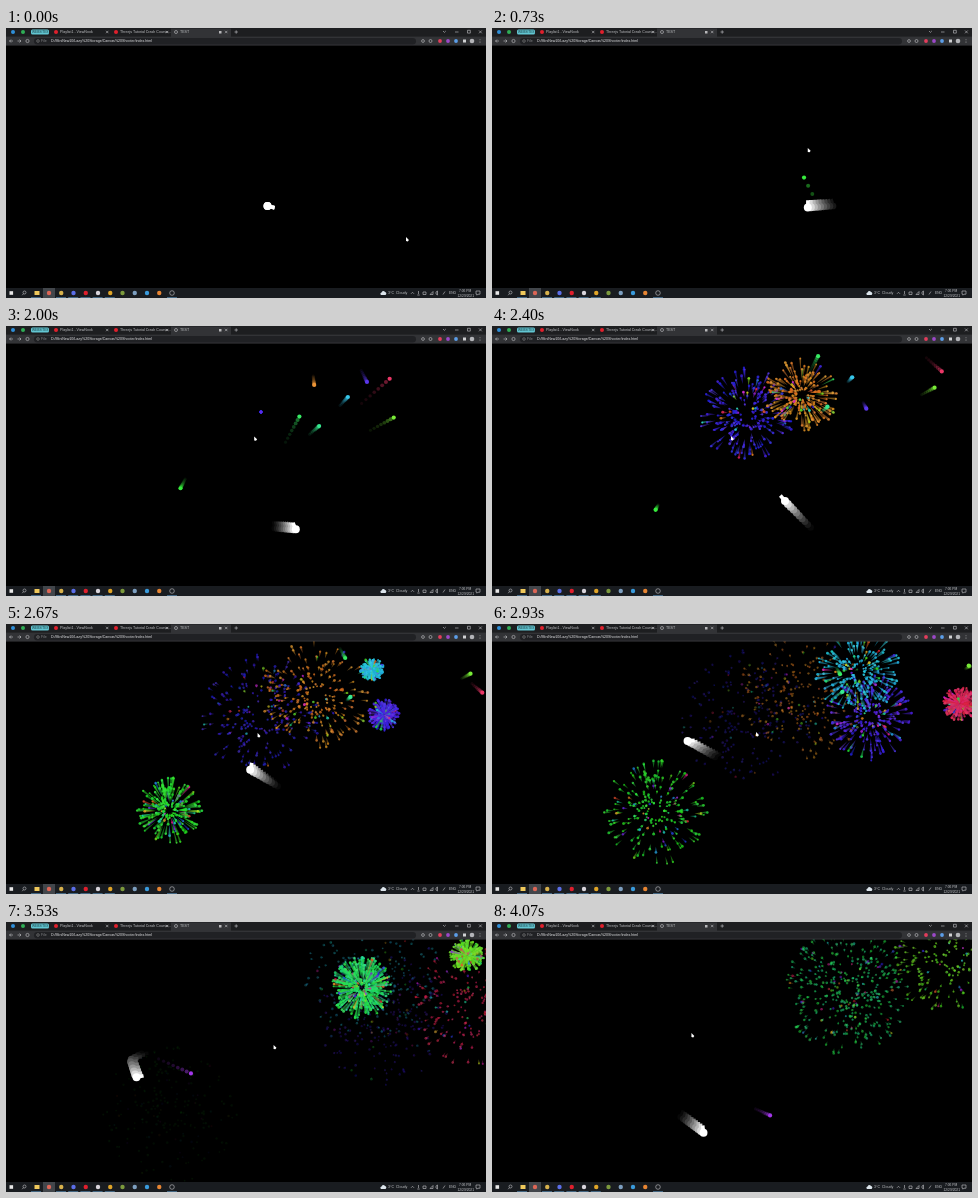
Recreate the animation shown at these times as an HTML page with a canvas. Size 480 px wide and 270 px high, loop 4140 ms.

```html
<!DOCTYPE html>
<html lang="en">
<head>
<meta charset="utf-8">
<title>Canvas Shooter</title>
<style>
html, body { margin: 0; width: 100%; height: 100%; overflow: hidden; background: #000; }
canvas, svg { position: absolute; left: 0; top: 0; width: 480px; height: 270px; display: block; }
text { font: 3.6px "Liberation Sans", Arial, sans-serif; fill: #c4c5c8; }
.line { fill: none; stroke: #c4c5c8; stroke-width: .6; }
</style>
</head>
<body>
<canvas id="stage" width="480" height="270"></canvas>
<svg viewBox="0 0 480 270">
  <rect width="480" height="9" fill="#1d1e20"/>
  <rect y="8.6" width="480" height="9" fill="#323336"/>
  <path d="M165 9V.6h60V9z" fill="#323336"/>
  <circle cx="7" cy="4" r="2" fill="#2f8fd8"/>
  <circle cx="17" cy="4" r="2" fill="#2fae55"/>
  <rect x="25" y="1.5" width="18" height="5" rx="1.5" fill="#62c6d2"/>
  <text x="26" y="5.3" textLength="auto" style="font-size:3.2px;fill:#17353a">WEBSITES</text>
  <circle cx="50" cy="4" r="2" fill="#e0202c"/>
  <text x="54" y="5.3">Playlist1 - ViewNook</text>
  <circle cx="110" cy="4" r="2" fill="#e0202c"/>
  <text x="114" y="5.3">Threejs Tutorial Crash Course...</text>
  <circle cx="170" cy="4" r="1.5" class="line"/>
  <text x="174" y="5.3">TEST</text>
  <path class="line" d="M100 2.8l2.4 2.4m0-2.4l-2.4 2.4M160 2.8l2.4 2.4m0-2.4l-2.4 2.4M219 2.8l2.4 2.4m0-2.4l-2.4 2.4M228.5 4h3.4M230.2 2.3v3.4"/>
  <rect x="213" y="3" width="2.5" height="2.5" fill="#b8b8ba"/>
  <path class="line" d="M437 3l1.4 1.4L439.800 3M449 4h3.5M461.500 2.3h2.8v2.8h-2.8zM473 2.5l2.8 2.8m0-2.8l-2.8 2.8"/>
  <rect x="28" y="10" width="382" height="6.500" rx="3.2" fill="#202124"/>
  <path class="line" d="M7 13H3.5l1.5-1.5M3.5 13l1.5 1.5M11.500 13h3.5l-1.500-1.5M15 13l-1.5 1.5"/>
  <circle cx="21.5" cy="13" r="1.6" class="line"/>
  <circle cx="32" cy="13" r="1.3" class="line" style="stroke:#888"/>
  <text x="35" y="14.3" style="fill:#85878a">File</text>
  <text x="45" y="14.3" style="fill:#e5e6e8">D:/MiniNew10/Lazy%20Storage/Canvas%20Shooter/index.html</text>
  <circle cx="417" cy="13" r="1.4" class="line"/>
  <circle cx="424.5" cy="13" r="1.5" class="line"/>
  <circle cx="434" cy="13" r="1.9" fill="#e33d5c"/>
  <circle cx="442" cy="13" r="1.9" fill="#9c48c8"/>
  <circle cx="450" cy="13" r="1.9" fill="#5c9ee8"/>
  <rect x="457" y="11.5" width="3" height="3" fill="#d0d1d3"/>
  <circle cx="466" cy="13" r="2.3" fill="#b3b4b8"/>
  <path class="line" d="M474 11.3v.7m0 .8v.7m0 .8v.7"/>

  <rect y="260" width="480" height="10" fill="#191c20"/>
  <rect x="37" y="260" width="12" height="10" fill="#42464b"/>
  <rect x="3.5" y="263.2" width="3.6" height="3.6" fill="#e8e8e8"/>
  <circle cx="18.5" cy="264.5" r="1.5" class="line"/>
  <path class="line" d="M17.5 265.7l-1.3 1.5"/>
  <rect x="28.5" y="263" width="5" height="4" fill="#efc85b"/>
  <g id="apps"></g>
  <circle cx="166" cy="265" r="2.3" class="line"/>
  <path d="M25 269.6h12m13 0h60m51 0h10" stroke="#67a7d5" stroke-width=".6" stroke-dasharray="10 2.2"/>
  <path d="M375 267q-1.500-2 .5-2.600q1.600-2.600 3.600-.3q2.200.8.500 2.900z" fill="#dce5ec"/>
  <text x="382" y="266.4">3°C</text>
  <text x="390" y="266.4">Cloudy</text>
  <path class="line" d="M405 265.800l1.500-1.500 1.500 1.500M412.500 263v3m-1.200 1h2.400M417 264h3v2.500h-3zM424 266.500l3-3v3zM430 264v2l1.500 1v-4zM437 266.500l2-3"/>
  <text x="443" y="266.4" style="font-size:3.3px">ENG</text>
  <text x="453" y="264.3" style="font-size:3.3px">7:06 PM</text>
  <text x="451.5" y="268.7" style="font-size:3.3px">12/29/2021</text>
  <path class="line" d="M470 263h4v3.200h-2l-1 1v-1h-1z"/>
</svg>
<script>
const LOOP = 4140, STEP = 1000 / 15, TICK = 1000 / 60;
const TOP = 20, RIGHT = 478;
const ctx = document.getElementById('stage').getContext('2d');

const appColors = ['#dd6656', '#d8b24c', '#5b6ee8', '#e01f2d', '#d9d5dc',
  '#e0a528', '#7c9a3c', '#7d9fc0', '#3a9bdc', '#e88532'];
document.getElementById('apps').innerHTML = appColors.map((c, i) =>
  `<circle cx="${43 + 12.25 * i}" cy="265" r="2.2" fill="${c}"/>`).join('');

// Key points: ms, x, y
const playerPath = [[150, 261.5, 178], [600, 341, 178], [1330, 203, 186], [1420, 204, 196],
  [1530, 224, 200], [2230, 322, 205], [2400, 293, 175], [2930, 196, 117],
  [3340, 144, 127], [3440, 124, 138], [3530, 130, 155], [4070, 212, 211]];
const mousePath = [[150, 401, 211], [530, 330, 130], [730, 317, 122], [1530, 260, 113],
  [2400, 240, 112], [2930, 265, 110], [3530, 269, 125], [4070, 200, 113]];

// Each shot leaves the player, slows down, bounces off the walls and bursts.
// x and y are its end point as if there were no walls.
const shots = [
  { hue: 122, fired: 675, end: 2430, x: 163, y: -145 },
  { hue: 246, fired: 820, end: 2000, x: 255, y: -46 },
  { hue: 31, fired: 880, end: 2130, x: 309, y: -27 },
  { hue: 252, fired: 1020, end: 2570, x: 378, y: -50 },
  { hue: 192, fired: 1150, end: 2600, x: 366, y: 45 },
  { hue: 150, fired: 1270, end: 3330, x: 356, y: 63 },
  { hue: 98, fired: 1385, end: 3430, x: 495, y: 33 },
  { hue: 344, fired: 1495, end: 2830, x: 488, y: -39 },
  { hue: 135, fired: 1600, end: 3330, x: 356, y: -25 },
  { hue: 276, fired: 3370, end: 4140, x: 286, y: 197 }
].map((shot, i) => ({ ...shot, from: along(playerPath, shot.fired), sparks: makeSparks(shot.hue, i + 7) }));

function seeded(seed) {
  let s = seed * 7919 + 11;
  return () => {
    s = (s + 0x6D2B79F5) | 0;
    let v = Math.imul(s ^ (s >>> 15), 1 | s);
    v = (v + Math.imul(v ^ (v >>> 7), 61 | v)) ^ v;
    return ((v ^ (v >>> 14)) >>> 0) / 4294967296;
  };
}

function makeSparks(hue, seed) {
  const rnd = seeded(seed);
  return Array.from({ length: 210 }, () => ({
    color: `hsl(${rnd() < .16 ? rnd() * 360 : hue + rnd() * 14 - 7} 75% ${46 + rnd() * 10}%)`,
    angle: rnd() * Math.PI * 2,
    reach: 74 * (.13 + .87 * rnd()),
    size: .9 + rnd() * .5
  }));
}

function along(path, t) {
  let i = 1;
  while (i < path.length - 1 && path[i][0] < t) i++;
  const [t0, x0, y0] = path[i - 1], [t1, x1, y1] = path[i];
  const k = Math.min(1, Math.max(0, (t - t0) / (t1 - t0)));
  return [x0 + (x1 - x0) * k, y0 + (y1 - y0) * k];
}

// Way covered under drag
const travel = (drag, ms) => 1 - Math.exp(-drag * Math.max(0, ms) / 1000);

function shotAt({ fired, end, from, x, y }, t) {
  const k = travel(1.5, t - fired) / travel(1.5, end - fired);
  const px = from[0] + (x - from[0]) * k, py = from[1] + (y - from[1]) * k;
  return [RIGHT - Math.abs(RIGHT - px), TOP + Math.abs(py - TOP)];
}

function disc(x, y, r) {
  ctx.beginPath();
  ctx.arc(x, y, r, 0, Math.PI * 2);
  ctx.fill();
}

function drawShot(shot, t) {
  if (t < shot.fired || t >= shot.end) return;
  ctx.fillStyle = `hsl(${shot.hue} 82% 57%)`;
  for (let i = 7; i >= 0; i--) {
    const at = t - i * TICK;
    if (at < shot.fired) continue;
    ctx.globalAlpha = i ? .6 * .76 ** i : 1;
    disc(...shotAt(shot, at), 2.1 - i * .08);
  }
  ctx.globalAlpha = 1;
}

function drawBurst(shot, t) {
  const age = (t - shot.end) / 1000;
  if (age < 0 || age > 1.15) return;
  const [x, y] = shotAt(shot, shot.end);
  const cy = y + 7 * age;
  const head = travel(2.6, age * 1000), tail = travel(2.6, age * 1000 - 125);
  const alpha = Math.min(1, (1.15 - age) / .75);
  for (const { color, angle, reach, size } of shot.sparks) {
    const c = Math.cos(angle), s = Math.sin(angle);
    const hx = x + c * reach * head, hy = cy + s * reach * head;
    ctx.fillStyle = color;
    ctx.globalAlpha = alpha * .5;
    ctx.beginPath();
    ctx.moveTo(x + c * reach * tail, cy + s * reach * tail);
    ctx.lineTo(hx - s * size, hy + c * size);
    ctx.lineTo(hx + s * size, hy - c * size);
    ctx.fill();
    ctx.globalAlpha = alpha * .85;
    disc(hx, hy, size);
  }
  ctx.globalAlpha = 1;
}

function drawPlayer(t) {
  for (let i = 9; i >= 0; i--) {
    const at = t - i * TICK;
    const [x, y] = along(playerPath, at), [mx, my] = along(mousePath, at);
    const g = Math.round(255 * (1 - i / 10) ** 1.5);
    ctx.fillStyle = `rgb(${g},${g},${g})`;
    disc(x, y, 4 - i * .08);
    ctx.save();
    ctx.translate(x, y);
    ctx.rotate(Math.atan2(my - y, mx - x));
    ctx.fillRect(0, -1.8, 7.2, 3.6);
    ctx.restore();
  }
}

function drawMouse(t) {
  const [x, y] = along(mousePath, t);
  ctx.fillStyle = '#fff';
  ctx.beginPath();
  ctx.moveTo(x - 1, y - 2);
  ctx.lineTo(x - 1, y + 2);
  ctx.lineTo(x + .8, y + 2.4);
  ctx.lineTo(x + 1.9, y + .9);
  ctx.fill();
}

function frame() {
  const now = performance.now() % LOOP;
  const t = Math.min(61, Math.floor((now + 4) / STEP)) * STEP;
  ctx.fillStyle = '#000';
  ctx.fillRect(0, 0, 480, 270);
  shots.forEach(s => drawBurst(s, t));
  shots.forEach(s => drawShot(s, t));
  drawPlayer(t);
  drawMouse(t);
  requestAnimationFrame(frame);
}
frame();
</script>
</body>
</html>
```
